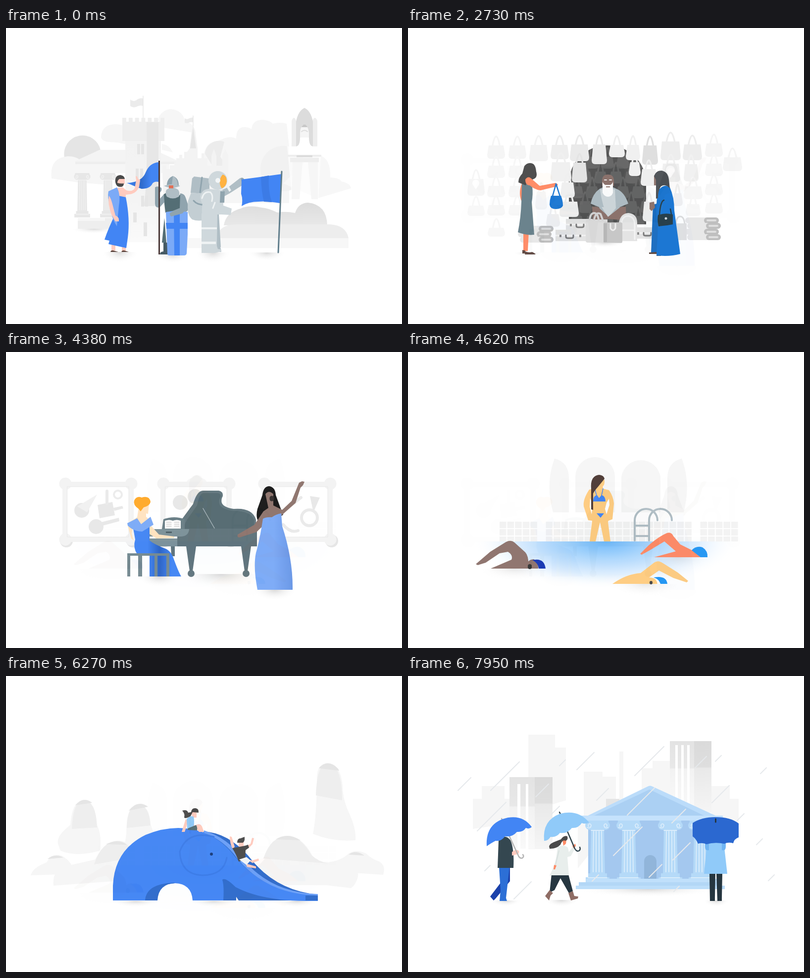
Recreate the animation shown at these times as an HTML page. Size 800 by 600 pixels, loop 8 s.

```html
<!DOCTYPE html>
<html lang="en">
<head>
<meta charset="utf-8">
<title>Six scenes</title>
<style>
html, body { margin: 0; width: 100%; height: 100%; overflow: hidden; background: #fff; }
svg { display: block; width: 100vw; height: 100vh; }
path { stroke-linecap: round; stroke-linejoin: round; }
</style>
</head>
<body>
<svg id="stage" viewBox="0 0 800 600"></svg>
<script>
const LOOP = 8000, STEP = 30, STEPS = 10;
const starts = [1380, 2730, 4380, 6030, 7680];

const palette = {
  white: '#fff', blue: '#4285f4', sky: '#7baaf7', navy: '#2f6bcb', dress: '#1976d2', pale: '#90caf9',
  steel: '#cfd8dc', iron: '#b0bec5', slate: '#90a4ae', teal: '#546e75', piano: '#61757d',
  pink: '#ffcbbf', coral: '#ff8a65', brown: '#8d736c', tan: '#ffcc80', peach: '#ffe3bf',
  ink: '#4a4a4a', night: '#263640', bark: '#5d463f',
  g1: '#f6f6f6', g2: '#eee', g3: '#e5e5e5', g4: '#dcdcdc'
};
for (const id of ['shade', 'water', 'fade', 'hill', 'block', 'side', 'fold', 'gown', 'skirt']) palette[id] = `url(#${id})`;

// Each line is "fill path", or "stroke/width path", or plain markup
const paint = text => text.trim().split('\n').map(line => {
  line = line.trim();
  if (line[0] === '<') return line;
  const gap = line.indexOf(' '), [name, width] = line.slice(0, gap).split('/');
  const colour = palette[name] || '#' + name;
  const look = width ? `fill="none" stroke="${colour}" stroke-width="${width}"` : `fill="${colour}"`;
  return `<path ${look} d="${line.slice(gap + 1)}"/>`;
}).join('');

const stops = list => list.split(' ').map(s => {
  const [colour, at] = s.split('@');
  return `<stop stop-color="#${colour}" offset="${at}"/>`;
}).join('');
const radial = (id, list) => `<radialGradient id="${id}" cx=".5" cy="0" r=".5">${stops(list)}</radialGradient>`;
const down = (id, list) => `<linearGradient id="${id}" x2="0" y2="1">${stops(list)}</linearGradient>`;
const across = (id, list) => `<linearGradient id="${id}">${stops(list)}</linearGradient>`;
const use = (id, x, y, more = '') => `<use href="#${id}" transform="translate(${x} ${y})${more}"/>`;
const shadow = (x, y, w, h) => `shade M${x} ${y}h${w}v${h}h${-w}z`;

const bag = ([x, y, w, h, c]) => `${c}/3.5 M${x + w * .3} ${y}q${w * .2} -36 ${w * .4} 0
  ${c} M${x + 3} ${y}h${w - 6}l3 ${h - 8}q0 8-7 8h${14 - w}q-7 0-7-8z`;

const stall = [
  [245, 237, 38, 33, 'f3f3f3'], [288, 237, 37, 29, 'eee'], [327, 236, 39, 34, 'eaeaea'], [371, 236, 31, 40, 'e9e9e9'],
  [406, 237, 32, 25, 'efefef'], [440, 237, 29, 31, 'f0f0f0'], [473, 238, 32, 39, 'dedede'], [510, 230, 41, 38, 'ededed'],
  [555, 236, 39, 32, 'ededed'], [636, 262, 39, 28, 'f5f5f5'], [288, 272, 42, 39, 'f0f0f0'], [331, 273, 31, 40, 'e4e4e4'],
  [446, 272, 24, 28, 'f0f0f0'], [470, 286, 33, 34, 'eee'], [512, 275, 38, 37, 'f0f0f0'], [557, 276, 30, 35, 'f1f1f1'],
  [308, 313, 29, 31, 'efefef'], [120, 306, 35, 34, 'f6f6f6'], [257, 332, 24, 36, 'f6f6f6'], [534, 335, 21, 26, 'f1f1f1'],
  [557, 321, 38, 26, 'f6f6f6'], [306, 352, 39, 31, 'eee'], [279, 377, 28, 26, 'f1f1f1'], [474, 352, 26, 40, 'f0f0f0'],
  [120, 360, 35, 21, 'f8f8f8'], [561, 357, 30, 24, 'f7f7f7'], [161, 405, 35, 18, 'f7f7f7']
];
const faint = [238, 279, 320, 359].flatMap((y, r) => [160, 203, 600].map(x => [x, y - (x > 500 ? 4 : 0), 36, 27 - r * 2, r ? 'f7f7f7' : 'f5f5f5']));
const inner = Array.from({ length: 30 }, (_, i) => {
  const r = i / 6 | 0;
  return [328 + i % 6 * 31 - r % 2 * 14, 261 + r * 30, 26, 24, '646464'];
});
const lines = (list, f) => list.map(f).join('\n');

// Pool wall: three rows with two joints left blank
const tiles = Array.from({ length: 93 }, (_, i) => {
  const col = i % 31, row = i / 31 | 0;
  return col === 5 || col === 25 ? '' : `M${185 + col * 15.6} ${344 + row * 15}h13.5v${row > 1 ? 10 : 13}h-13.5z`;
}).join('');

const drops = [
  [101, 232, 26], [167, 232, 58], [140, 314, 58], [341, 190, 35], [458, 202, 59], [381, 252, 24], [443, 282, 55],
  [306, 182, 12], [415, 364, 58], [535, 373, 35], [487, 408, 26], [614, 257, 35], [621, 173, 12], [712, 198, 12],
  [704, 342, 12], [728, 415, 12], [665, 293, 14], [155, 395, 11], [214, 452, 35], [533, 298, 28], [290, 280, 16],
  [258, 245, 26], [580, 186, 23], [372, 416, 13], [537, 437, 11]
];
const rain = drops.map(([x, y, n]) => `M${x} ${y}l${n} ${-n}`).join('');
const merlons = Array.from({ length: 7 }, (_, i) => `M${235 + i * 12.83} 182h8v9h-8z`).join('');

const defs = `
${radial('shade', 'd8d8d8@0 ffffff00@1')}
${radial('water', '6bb8fa@0 a9d5fc@.35 dfeffe@.7 ffffff00@1')}
${down('fade', 'f2f2f2@0 f4f4f4@.6 fafafa@1')}
${down('hill', 'dcdcdc@0 e8e8e8@1')}
${down('block', 'e3e3e3@0 e8e8e8@.4 f2f2f2@.42 f9f9f9@1')}
${down('side', 'dadada@0 dedede@.36 e9e9e9@.38 f5f5f5@1')}
${across('fold', '4285f4@0 2f6bcb@.45 4285f4@.75')}
${across('gown', '7baaf7@.5 6795e6@1')}
${across('skirt', '4285f4@.3 2a62c4@.55 4285f4@.8')}
<clipPath id="arch"><path d="M325 398V315a78 77 0 0 1 156 0V398z"/></clipPath>
<g id="col">
<path d="M-22 0H22V5H-22zM-15 5H15V18H-15zM-13 18H13L15 110H-15zM-19 107H19V116H-19zM-24 115H24V125H-24z"/>
<circle cx="-16" cy="10" r="9"/><circle cx="16" cy="10" r="9"/>
ffffff88/1.8 M-18 12a3 3 0 1 1 5-2q-1 7-8 4M18 12a3 3 0 1 0-5-2q1 7 8 4M-8 22L-9 104M-3 22V104M3 22V104M8 22L9 104M-19 116H19M-13 20H13
</g>
<g id="case">
e3e3e3 M0 0H64V23H0z
f1f1f1 M0 10H64V13H0z
777/3 M21 11v3q0 3 4 3h7q4 0 4-3v-3
888 M8 10h4v5H8zM48 10h4v5h-4z
</g>
<g id="roll">
e8e8e8/12 M6 6H60
bdbdbd/12 M44 6H62
dedede/4 M45 6H61
</g>
<g id="frame">
e6e6e6 M10 10H149V124H10z
e6e6e6/26 M14 123h0M148 123h0
white M11 8H145V120H11z
f3f3f3/10 M11 8H145V120H11z
f3f3f3/25 M12 7h0M145 7h0M12 120h0M145 120h0
e8e8e8/1 M16 13H140V115H16z
</g>`;

const eras = `
g3 M118 262a37 37 0 0 1 73-14l-54 24z
g1 M92 305q-5-42 33-45 20 0 30 13h40l10 45-60-5zM192 220q2-25 30-25 16 0 25 10v32q-20-6-40-6-15-2-15-11zM307 186a27.5 27.5 0 0 1 54 2q20 6 22 25l-66-11zM315 235q15 2 22 17l-22-5z
f4f4f4 M137 271L189 247H300L351 271z
g2 M140 271H346V276H140zM145 385H250V407H145z
g1 M143 276H330V294H143zM145 385H200V391H145z
<g fill="#e7e7e7">
${use('col', 154, 294, 'scale(.66 .72)')}
${use('col', 206, 294, 'scale(.66 .72)')}
</g>
fade M241 226H313V434H241z
g2 M235 190H320V229H235z${merlons}
e7e7e7 M284 191h24v90q2 40-8 80h-22q8-40 6-170z
g3 M265 235h6v21h-6zM273 235h6v21h-6zM262 285h6v21h-6zM271 285h6v21h-6zM273 340h6v22h-6zM281 340h6v22h-6zM257 374h7v20h-7zM278 394h7v28h-7z
ebebeb M251 145q8 6 14 0 6-4 12-2v15q-7-2-12 1-7 4-14-1zM361 183q5 3 9 0l8-2v10q-6-1-9 1-4 2-8 0z
e8e8e8/1.5 M277 138V182M378 178V202
g1 M400 255q4-24 28-26l14-6q14-4 23 1 0-25 20-23 7 1 11 4 2-19 23-19 16 2 20 8 14-4 28 0l5 46v115H400z
ececec M402 255a28 28 0 0 1 39-24l-8 30 14 20-20 15z
f3f3f3 M316 300V278h8v8h7v-8h9v-6h4v-8h6v-7h6v7h4v-13h6l5-7 4-36 3-10 4 10 5 36v20h8v-10h5v10h7v15h8v-20l5-14 5 14v20h12v-20l6-14 6 14v62l-30 55H320z
g3 M378 200l6 44h-12z
f1f1f1/92 M560 285h0
f7f7f7 M620 256q37 0 35 47 20 1 22 8 18 3 20 14l-67 20-70-30z
ffffffb0 M568 240H637L631 348H578z
g1 M579 272h20l-6 75h-16zM610 272h20v75h-13z
g2 M577 258V188q5-12 9 0v70zM619 258V188q5-12 10 0v70z
g4 M586 240V190q4-22 17-28 13 6 17 28v50z
f5f5f5 M594 258V212q0-12 9-17 8 5 9 17v46z
c7c7c7 M597 201q6-11 12 0z
ddd/2 M597 210q6-5 12 0
white M571 240h14q9 0 9-18h18q0 18 9 18h14v17h-64z
g2 M569 257H637V261H569zM574 263H632V272H574z
g4 M587 258h32v4h-32z
hill M440 400q4-26 34-34 15-8 42-2 14 1 32 10 18-3 36 1 6-20 26-21 38 4 39 46z
ededed M425 426q5-28 40-28h190q32 2 37 28z
f7f7f7 M360 426H692V446H360z
${shadow(128, 407, 100, 20)}
${shadow(192, 454, 76, 44)}
${shadow(302, 459, 70, 36)}
${shadow(382, 455, 72, 44)}
${shadow(488, 455, 78, 36)}
fold M309 272q-19 1-27 21-8 20-38 21 19 8 30 12 17 0 22-11 4-5 13-3z
pink M224 324l12-1 7 6q12 4 17-4l3-17-1-8 3 1 2 5 4 2-2 14q-6 14-19 15l-8 1v8l-16-4zM213 438h8v13h-8zM234 443h8v9h-8z
blue M227 340l15 3q9 44 4 82l-3 21-36-8 2-7-10-2q8-24 23-54z
sky M207 331l17-8q8 14 4 37l-4 42q-12-18-13-42-7-15-4-29z
pink M208 340q4 5 7 17l6 23q8 3 7 12h-7l-8-14q-8-22-5-38zM225 306h15v10h-15z
bark M211 454q1-4 6-3l10 3zM233 454q2-4 6-3l9 3z
ink M221 313q-2-14 10-15 8 1 9 8h-11q-4 3-4 8 7 2 13 1 0 8-8 7-7 0-9-9z
teal M320 385l4 50h-9zM318 338q6-6 14-3 10 16 21 1l5 16-1 22h-35z
455a64 M318 435h14v24h-21q0-6 7-6z
slate M301 323q5-4 13 1 2 6-4 10v13l9-10 1 16-10 11q-9 1-9-8zM352 335q9 1 11 9l6 18q1 10-10 12l-24 8q-6-4-4-9l20-8z
iron M324 328q12-9 24 0 4 7 1 14-12 7-24 0-4-7-1-14z
slate M325 319q0-14 12-19 12 4 12 19z
iron M337 300q9 4 10 18h-12zM319 320q16-7 33 0-16 8-33 0z
e06f55 M329 319h9v6h-9z
4b3938 M308 269h3V459h-3z
sky M323 373q21-4 44 0v45l-2 39q-1 4-5 4h-30q-4 0-4-4z
blue M339 371h12v90h-11zM323 395h44v12h-43z
slate M331 375q14-9 32-6l-7 7-22 6q-4-2-3-7z
iron M380 301l31 4v32l-38-3 3-29z
c3ced3 M374 334l37 3v49q-20 8-35 2-12-10-8-38z
slate/3 M379 350q9 11 32 8M396 303l-4 30
iron M424 334l26-12 23-18 8 3-1 10-28 18-20 11zM414 376h16l4 68-19 3zM421 444h12l2 8v2h-14z
steel M408 326l30 3q4 20-2 49h-40q-2-30 12-52zM395 376h32l-1 66 2 6 7 1v4l-13 3h-27z
eef2f3 M395 404h31v4h-31zM395 433h29v5h-29zM446 323l4-3 5 9-4 3z
slate M433 331h9l-1 23h-9z
steel M392 342q5-18 21-15 10 5 8 23l10 7 25 9-2 13-19-1-30-13q-12-9-13-23z
eef2f3/3 M396 345q4-15 17-12 6 6 3 18M422 354l-4 11
steel/38 M428 309h0
ffb240 M438 297q8 2 8 14-1 10-10 14-5-6-4-15 1-9 6-13z
f3f6f7/10 M428 309h0
slate M474 304q6-2 8 5l-6 4z
blue M476 307l81-11-4 59q-28-5-43-3-20 0-34 9 3-14-1-25z
3c7be6 M515 302q1 30 6 50l16 1q-8-24-6-54z
607d8b/3 M557 291L550 455`;

const market = `
505050 M325 387V315a78 77 0 0 1 156 0V398H325z
<g clip-path="url(#arch)">
${lines(inner, bag)}
</g>
${lines(faint.concat(stall), bag)}
white M131 318a7 7 0 1 1 12 0l-6 9zM522 292a9 9 0 1 1 16 0l-8 12z
${lines([[226, 401], [222, 412], [226, 423], [560, 384], [564, 395], [560, 407], [564, 418]], p => use('roll', ...p))}
${lines([[319, 387], [298, 409], [455, 404]], p => use('case', ...p))}
e2e2e2 M530 396h33v34h-33z
ddd/3 M541 396q2-14 9-14t9 14
iron M369 356q4-20 18-30 18-9 34 0 16 6 24 30l-17 7-5 17q-18 8-32 0l-5-17z
steel M388 327h30l2 38-16 20q-12-25-16-58z
brown M372 362l12 1 21 19 24-19 11-1 1 28-37-3-31 3zM392 310q0-13 12-13t12 13v10h-24z
steel M391 363h28l-15 20z
white M393 312q4 7 7 6h7q4 1 7-6v22q-3 8-10 8t-11-8z
eee/2 M397 308h4M407 308h4
brown M400 321h8v2h-8z
g4 M359 392q0-4 5-4h39v47h-40q-4 0-4-4z
d4d4d4/4 M367 388q2-13 9-13t9 13M376 388q4-17 13-11l4 11
e4e4e4 M426 432V394q4-19 20-19 17 2 17 20v37z
f3f3f3/3 M431 400q0-19 14-19 13 2 13 19v28M431 410h27
c6c6c6 M395 397q0-3 3-3h32q3 0 3 3v36q0 3-3 3h-32q-3 0-3-3z
b5b5b5 M395 396h7v38h-7z
eee/3 M409 397v9q5 8 10 0v-9
${shadow(212, 455, 62, 18)}
${shadow(355, 435, 85, 20)}
${shadow(486, 457, 70, 14)}
coral M230 315l7 5-4 25-3 8q-8-18 0-38zM233 414h11l-2 38h-9z
67808a M233 303l18 18q2 15-1 32l5 66q-16 2-33-5 6-30 7-60l1-36z
ink M235 280q7-9 17-5 6 3 7 16 3 10-3 14l-16 8-2 6-15-6q0-10 8-18z
coral M237 307q6-9 14 0l15 13 32-6 5 3-2 4-33 8q-12-1-22-10-9 0-9-12z
bark M231 450l6 1v6h-6zM237 453q7 3 14 1l7 4-2 1h-20z
dress/2.5 M292 341l7-25 8 25
dress M289 340h20q4 10 4 20-3 7-14 7-12 0-13-9 0-9 3-18z
176bc0 M495 358l15-4v102h-19z
bark M487 455l16-1v4h-16zM502 458l9 1v3h-9z
dress M505 330q12-16 24-7 9 20 9 47l12 88q-22 6-48 3l3-61q-7-25 0-70z
brown M497 299h9v20h-9zM488 354l9-2 2 12-7 7-4-4z
4c5054 M497 300q4-11 15-11 13 2 15 18l2 18q-9-10-18-4-6 8-6 24l-4 1v-38z
263d47/2.5 M508 379q2-28 9-30M532 377l-2-10
263d47 M505 379q16-5 30-1v20q-14 3-29 4-3-12-1-23z
steel/5 M521 386h0`;

const recital = `
g1 M365 263q4-7 10-7 10-12 20 0 8 1 10 7z
${use('frame', 108, 260)}
${use('frame', 306, 260)}
${use('frame', 510, 260)}
e8e8e8/30 M153 321h0M182 354h0M352 305h0M382 293h0
f1f1f1 M144 313l40-24-20 36z
e8e8e8 M185 310l30-6 5 27-31 6zM217 316l18-4 2 5-18 5zM180 348l48-12 1 7-45 12zM614 292l20 3-13 30z
eaeaea/6 M204 282v26M560 350q15 18 30 12M556 325l40-30M597 336a16 16 0 1 0 32 0a16 16 0 1 0-32 0
ececec/4 M218 289a8 8 0 1 0 16 0a8 8 0 1 0-16 0
${shadow(265, 455, 90, 44)}
${shadow(345, 450, 180, 60)}
${shadow(498, 482, 90, 44)}
piano M352 360l4-22 22-30q8-27 20-27h32q9 2 8 11-4 7-2 14 4 9 24 12 38-3 45 22v20z
536970 M360 358q0-12 10-24l16-23q5-25 13-25h29q7 2 6 7-6 8-2 17 5 9 28 12 34 0 41 18v18z
a5b3b9/1.5 M398 317l23 40
5e727a M346 358H507V394H346zM364 394h20l-7 50h-6zM475 394h20l-7 50h-6zM333 394h8v20h-7z
piano/14 M374 449h0M485 449h0
7b9098 M288 359H370q-1 14-16 15H288zM288 376h58v18h-58z
4a5c63 M323 364h12v3h-12z
white M286 374h60v4h-60z
687d85 M318 339q22-8 43 0v20h-46z
white M321 342q9-3 16 0 8-3 16 0v16h-32z
ccc/1.5 M324 345h10M340 345h10M324 349h10M340 349h10M324 353h10M340 353h10
peach M268 316h15v18l8 7-16 22-23-5-7-10 20-13zM291 350l9 10 9 10 31 4v3l-36 1-14-9-9-13zM246 352l10 4-2 12 4 14-5-4z
skirt M257 358q20 5 33-6 0 20 0 30 8 7 28 15 14 4 20 20 10 28 16 38H290V410h-25q-9-14-4-30z
sky M245 347l20-10 8 12 19-15 6 16-23 14q-17 0-29-12z
peach M277 308h12l-2 20-12-2z
ffa928 M268 318q-12-8-9-17 5-10 15-6 16-5 18 9-2 8-14 11l-6 8z
748990 M245 408h85v47h-6v-42h-18v42h-6v-42h-25v42h-8v-42h-16v42h-6z
171717 M518 290q2-18 14-18 12 2 13 18l11 30 4 10-42 22q-16-10-10-34z
brown M524 288q7-9 16 0v23l18 9 19-18 15-37 6-3 5 1-3 7-5 5-10 31-27 24-32 16-20 19-31 10q-9 3-7-5l34-20 18-27 10-7z
332d2c/9 M537 296v2
gown M519 338q8-4 18-3 8-6 19-8l2 26q22 68 21 129h-71q-9-47-3-75 8-28 14-69z`;

const pool = `
g1 M338 325V253a40 40 0 0 1 80 0v72zM431 325V253a40 40 0 0 1 79 0v72zM296 216q29 7 29 40v69h-32q-16-58 3-109zM553 216q-29 7-29 40v69h33q15-58-4-109z
f3f3f3 ${tiles}
water M130 384H668V576H130z
<g opacity=".6">
${shadow(140, 439, 150, 50)}
${shadow(480, 416, 130, 50)}
${shadow(405, 470, 150, 52)}
</g>
iron/4 M458 382V341a23 23 0 0 1 46 0M487 382V341a23 23 0 0 1 46 0M458 352h29M458 373h29
tan M385 268h8l1 9 12 3q9 13 10 27l-3 32-8 3-1 2 5 40h-13l-8-39-9 39h-12l5-42-8-1-9-28q-2-14 11-34l16-4z
white M368 296l5 14-2 19-4-15zM401 306l5-9 1 13-6 19-3-11z
blue M374 303q0-12 8-13l4 6 5-6q8 2 8 13zM381 327h15l-7 9z
blue/1.5 M381 291l-4-15M391 291l3-14
tan M388 259h9q1 12-5 14l-6-2z
4e3a35 M370 276q-2-25 16-27 10 1 11 8l-13 16q-8 9-10 14v33l-4-1z
brown M137 430l29-25 32-20q10-5 17 1l22 20q8 9 6 33h-76l42-18q4-9-7-16l-17 3-28 19-16 5zM240 439q-2-18 14-19 10 5 9 19z
1838b4 M251 422q24-6 27 17h-14q-1-12-13-17z
353535/8 M246 434v2
coral M469 409l17-17q22-19 37-25 9-3 13 6l14 17 24 12 18 14h-95l44-12-23-20-28 17-18 10z
2196f3 M573 402q9-10 22-6 11 7 10 20h-14z
tan M413 470q28-20 57-22l27-21q8-6 18 1l30 19 21 17-3 3-27-9-29-15-20 14q15 0 17 13z
2196f3 M496 457q26-5 28 13h-14q-3-10-14-13z
444/6 M491 467v1`;

const slide = `
g1 M105 340q-4-16 25-38 3-49 27-50 24 1 27 50 10 22 6 52-48 14-80 0zM243 320q0-58 25-59 22 1 24 40 6 18 18 40h-70zM620 320q8-40 8-115 1-28 22-28 26 2 30 45 0 30 15 60 13 30 11 51-44 4-86-13z
g1 M96 425q-3-28 18-38l66-15q20-38 48-38 35 2 55 50l-40 30zM490 400q40-28 48-58 14-18 33-18 34 4 53 52l75 5q14 6 12 26-4 16-14 23l-50-6H500z
g1 M50 404q4-16 32-26 10-18 30-14 12 6 20 18l-20 20zM650 378q28-4 42-18 15-10 36 0 9 10 26 16 14 8 8 27l-60-4z
g2 M133 310q2-57 24-58 23 1 26 45l1 10zM244 308q0-46 24-47 21 1 24 42zM626 242q2-65 24-65 29 3 29 75zM178 382q15-48 50-48 13 2 24 15v20zM520 370q15-46 50-46 26 2 47 39 15 14 35 17z
g3 M140 262q16-19 34-5zM248 273q18-23 39-8zM632 187q18-21 39 1l2 4zM202 341q24-12 42 1zM545 331q24-15 50 2zM84 371q14-13 32-3zM692 362q15-11 32 2z
${shadow(212, 456, 100, 26)}
${shadow(370, 456, 100, 26)}
${shadow(540, 456, 95, 26)}
navy M398 315q50 2 92 50 53 70 140 78v12H470L440 410z
blue M216 455V425q3-72 66-103 62-26 120-4 37 16 62 50 62 74 166 76v12h-25q-90-1-141-28v27h-87q-2-34-36-35-52 5-59 35z
navy M281 455q2-34 58-36l3 1q-34 1-36 35zM439 455q2-30-2-42 6-6 28 16v26zM605 445l25-1v11h-25z
6a9ff7 M400 318q40 14 68 53 60 72 162 74v-3q-96-3-152-72-30-42-78-57z
3b7be8/3 M420 326q-54-14-69 30 2 46 45 48 44 0 50-36
183b79/6 M415 361h0
pink M363 290l5 4-7 22h-6zM374 275h11v12h-8zM381 304q12-9 16 4l3 8h-10zM378 292l3 12-5 1z
pale M365 290q6-8 14-5 2 10 0 21l-13 4z
teal M367 309l17-7q3 5 2 11l-19-1z
ink M356 273q10-3 12 4l6-1q1-9 9-8 7 1 6 9l-12-1-4 8q-10 6-13 3 2-8-4-14z
pink M452 325l4 1 6 20-4 5q-6-12-6-26zM486 345l8-5 3-12 4 1-3 12-8 8zM470 335h10v11h-10zM483 370l14 4 13-4 1 4-13 5zM484 380l21 6v4l-18-3z
ink M457 349l26-5 6-2 2 6-7 5-1 20-13 3q-5-15-13-27zM467 338q0-9 7-9l8-3q1 10-4 12z
f2f5f8 M471 372l15-5 8 7-8 9z`;

const bank = `
g1 M131 310V249h18V223h46v26h10v50zM243 270V119h54v26h22v107l-30 9v90h-46zM343 390V290h12V194h38v10h27v90zM427 260V153h8v107zM472 260V187h22V172h36v90zM613 265V223h37v26h18v60h-55z
g3 M400 249h27v20h-27z
block M205 205h51v145h-51z
block M529 132h49v135h-49z
side M256 205h36v145h-36z
side M578 132h35v145h-35z
white M221 219h6v135h-6zM238 219h5v135h-5zM540 140h5v120h-5zM552 140h5v120h-5zM564 140h5v120h-5z
bbdcfa M343 293L484 224q5-3 10 0L632 288v5z
abd0f3 M376 283L488 230 598 283z
c5e2fc M348 283H636V293H348z
a4c8ef M364 293H612V418H364z
91b5da M477 418V376a12.5 13 0 0 1 25 0v42z
<g fill="#b5daf8">
${lines([383, 446, 530, 591], x => use('col', x, 293))}
</g>
c0e0fb M360 411H625V418H360z
b3d7f6 M345 418H633V425H345z
bddefa M339 425H640V432H339z
${shadow(165, 455, 65, 24)}
${shadow(275, 454, 70, 28)}
${shadow(596, 455, 54, 26)}
${shadow(340, 432, 290, 32)}
e6e9ec/2 ${rain}
1b41ab M187 388h19v28l-29 35-4 4-7-8 22-29z
2c6fd6 M184 388h21l-7 62 2 6h-15l2-22z
344750 M183 334q12-16 24-1 8 18 6 56h-32z
pink M210 357q6-6 12-4 5 3 0 8l-12 3z
b5b5b5/2.5 M203 321l19 41q3 9 9 7 4-3 1-7M190 291l-1-2
blue M159 345q-3-48 43-58 31-5 48 19-5 5-12 2-6 9-18 8-9 11-24 9-8 11-19 9-8 4-18 11z
night M290 402h34l9 34-8 4-17-30-12 24-10 5z
8f6d65 M286 434l7 6-5 5-3 10-8-9zM324 440l9-4 3 10 8 1-1 4-14 4z
e8eeec M302 346q14-5 21 2l2 9 8-11 4 4-8 15-7 2 3 37h-39q14-24 16-58z
d8e0df/2 M305 354l-7 29
coral M295 383l5 1-3 8h-3zM332 344l6-4 1 5-5 4zM312 332h8l-1 8-5 4z
ink M285 345q2-6 14-10l10-4q6-9 13-6 2 8-4 9-6-3-10 8-9 9-22 8z
344750/2.5 M308 280l-2-4M322 315l15 35q4 7 9 4 3-3 1-7
pale M275 334q-4-42 33-55 36-9 58 18-8 4-15 1-7 11-20 10-9 12-24 10-8 10-19 8-6 9-13 8z
night M609 400h12l-1 49v7h-10zM623 400h12l-1 49v7h-9z
pale M604 338h34l7 63h-47z
70b5f3 M600 338h8v15q-8 2-8-7zM634 338h8v8q0 9-8 7z
2b68d0 M575 298q18-12 46-12 31 0 47 13v28q-9 3-11 12-10-3-18 1-19-4-36 1-9-4-17-1-4-10-11-15z
night/3 M621.500 290v6`;

const stage = document.getElementById('stage');
const group = text => `<g class="scene">${paint('white M0 0H800V600H0z' + text)}</g>`;
stage.innerHTML = `<defs>${paint(defs)}</defs>` + [eras, market, recital, pool, slide, bank].map(group).join('');
const scenes = [...stage.querySelectorAll('.scene')];

// Each scene dissolves over the last in ten eased steps
function mix(t, start) {
  const k = Math.min(STEPS, Math.max(0, Math.floor((t - start) / STEP) + 1)) / STEPS;
  return k * k * (3 - 2 * k);
}

function draw(t) {
  const mixes = scenes.map((_, i) => i ? mix(t, starts[i - 1]) : 1);
  scenes.forEach((scene, i) => {
    scene.style.display = mixes[i] > 0 && mixes[i + 1] !== 1 ? '' : 'none';
    scene.style.opacity = mixes[i];
  });
}

const origin = performance.now();
function tick() {
  draw((performance.now() - origin) % LOOP);
  requestAnimationFrame(tick);
}
tick();
</script>
</body>
</html>
```
